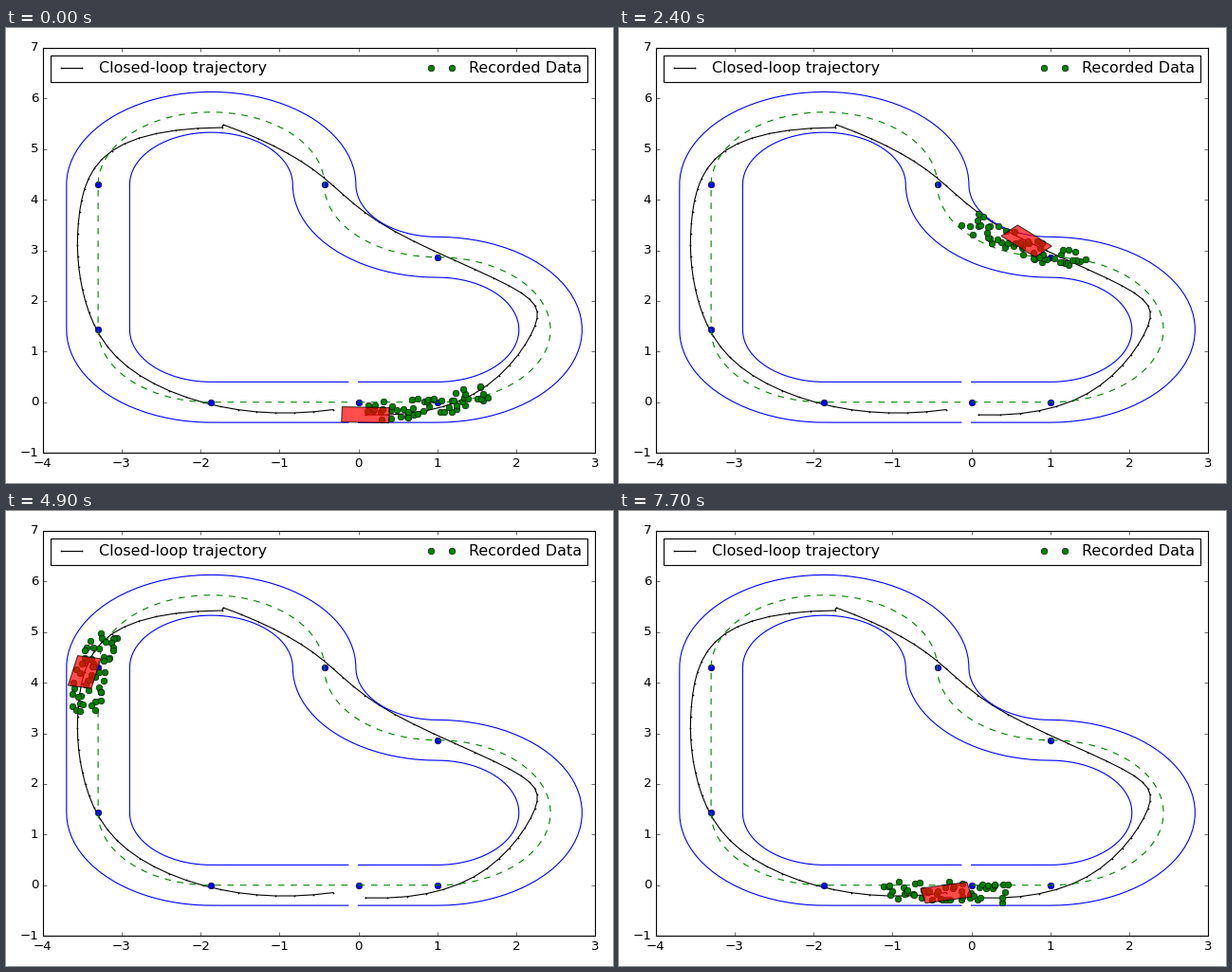
Animation of 640 by 480 pixels, one loop 7.8 s. Source, as a matplotlib script:

```python
import numpy as np
import matplotlib.pyplot as plt
from matplotlib.animation import FuncAnimation
from matplotlib.patches import Polygon

plt.style.use("classic")
plt.rcParams.update({"font.family": "DejaVu Sans", "savefig.dpi": "figure"})

FRAMES, INTERVAL = 78, 100
R = 4.5 / np.pi
HALF_WIDTH = 0.4
CAR_LENGTH, CAR_WIDTH = 0.6, 0.3
DENSITY, REACH, SPREAD = 32, 0.83, 0.19

# Track sections: (length, signed curvature)
SECTIONS = [(1, 0), (4.5, 1 / R), (2.25, -1 / R), (4.5, 1 / R),
            (2 * R, 0), (2.25, 1 / R), (2 * R - 1, 0)]

# Evenly timed key points of the lap, before and after the jump at the top
LAP_A = [(.09, -.25), (1.52, .217), (2.22, 1.45), (1.907, 2.30),
         (.387, 3.438), (-.534, 4.551), (-1.71, 5.48)]
LAP_B = [(-1.73, 5.425), (-3.165, 4.915), (-3.542, 3.617), (-3.495, 2.225),
         (-3.02, .827), (-1.823, -.061), (-.32, -.147)]


def track_pose(s):
    """Centre line position and heading at arc length s."""
    x = y = a = 0.0
    for length, k in SECTIONS:
        d = min(s, length)
        if k:
            x += (np.sin(a + k * d) - np.sin(a)) / k
            y -= (np.cos(a + k * d) - np.cos(a)) / k
        else:
            x, y = x + d * np.cos(a), y + d * np.sin(a)
        a += k * d
        s -= d
        if s <= 0:
            break
    return x, y, a


def spline(keys, n):
    """Cubic spline through evenly spaced keys, sampled n times."""
    p = np.array(keys)
    m = len(p)
    A, b = np.eye(m), np.zeros_like(p)
    A[0, 1] = A[-1, -2] = -1
    for i in range(1, m - 1):
        A[i, i - 1:i + 2] = 1, 4, 1
        b[i] = 6 * (p[i - 1] - 2 * p[i] + p[i + 1])
    bend = np.linalg.solve(A, b)
    t = np.linspace(0, m - 1, n)
    i = np.minimum(t.astype(int), m - 2)
    v = (t - i)[:, None]
    u = 1 - v
    return (u * p[i] + v * p[i + 1]
            + ((u**3 - u) * bend[i] + (v**3 - v) * bend[i + 1]) / 6)


def headings(p):
    d = np.gradient(p, axis=0, edge_order=2)
    return np.arctan2(d[:, 1], d[:, 0])


def shift(pos, ang, dist):
    """Move points sideways, to the left of their heading."""
    return pos + np.column_stack([-np.sin(ang), np.cos(ang)]) * np.reshape(dist, (-1, 1))


# Track
ends = np.cumsum([0] + [length for length, _ in SECTIONS[:-1]])
knots = np.array([track_pose(s) for s in ends])
centre = np.array([track_pose(s) for s in np.arange(192) * 0.1])

# Driven lap; the car's slip angle follows its turn rate
halves = [spline(keys, FRAMES // 2) for keys in (LAP_A, LAP_B)]
lap = np.vstack(halves)
course = np.unwrap(np.concatenate([headings(h) for h in halves]))
yaw = course + 0.9 * np.gradient(course) - np.radians(4)

# Recorded points: scattered around the lap, drawn towards the centre line
road = np.vstack([lap, lap[:6]])
road_dir = np.unwrap(np.concatenate([course, course[:6]]))
arc = np.concatenate([[0], np.cumsum(np.hypot(*np.diff(road, axis=0).T))])
rng = np.random.default_rng(5)
count = int(DENSITY * (arc[FRAMES - 1] + 1))
rec_s = (np.arange(count) + rng.random(count)) / DENSITY
rec = np.column_stack([np.interp(rec_s, arc, road[:, i]) for i in (0, 1)])
gaps = np.linalg.norm(rec[:, None] - centre[None, :, :2], axis=2)
rec += 0.4 * (centre[gaps.argmin(axis=1), :2] - rec)
rec = shift(rec, np.interp(rec_s, arc, road_dir), rng.uniform(-SPREAD, SPREAD, count))

# Figure
fig, ax = plt.subplots(figsize=(8, 6), dpi=80, facecolor="white")
ax.set(xlim=(-4, 3), ylim=(-1, 7), xticks=range(-4, 4), yticks=range(-1, 8))
ax.plot(knots[:, 0], knots[:, 1], "bo")
ax.plot(centre[:, 0], centre[:, 1], "g--")
for side in (HALF_WIDTH, -HALF_WIDTH):
    ax.plot(*shift(centre[:, :2], centre[:, 2], side).T, "b-")
ax.plot(*lap.T, "-ok", markersize=1, zorder=1.5, label="Closed-loop trajectory")
dots, = ax.plot([], [], "og", label="Recorded Data")
car = Polygon(np.zeros((4, 2)), closed=True, fc="r", ec="k", alpha=0.7, zorder=10)
ax.add_patch(car)
ax.legend(loc="upper left", bbox_to_anchor=(0, 0, 1, 1), mode="expand", ncol=2)
fig.tight_layout()

BODY = np.array([(1, 1), (1, -1), (-1, -1), (-1, 1)]) * (CAR_LENGTH / 2, CAR_WIDTH / 2)


def update(i):
    c, s = np.cos(yaw[i]), np.sin(yaw[i])
    car.set_xy(lap[i] + BODY @ np.array([(c, s), (-s, c)]))
    start = max(arc[i] - REACH, 0)
    near = (rec_s >= start) & (rec_s <= start + 2 * REACH)
    dots.set_data(*rec[near].T)
    return dots, car


anim = FuncAnimation(fig, update, frames=FRAMES, interval=INTERVAL, repeat=True)
plt.show()
```
